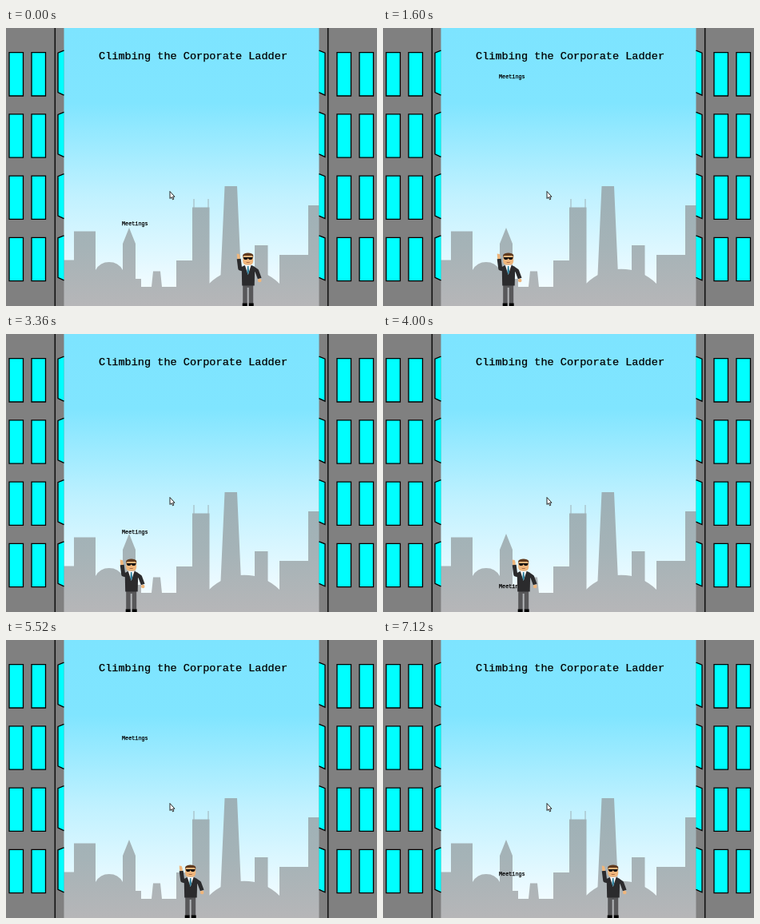
Animation of 464x348 px, one loop 7.2 s. Source, as an HTML page:

```html
<!DOCTYPE html>
<html lang="en">
<head>
<meta charset="utf-8">
<title>Climbing the Corporate Ladder</title>
<style>
  html, body { margin: 0; width: 100%; height: 100%; overflow: hidden; }
  svg { display: block; width: 464px; height: 348px; }
  text { font-family: "Courier New", "Liberation Mono", monospace; stroke: #000; stroke-width: .25; }
</style>
</head>
<body>
<svg viewBox="0 0 464 348" xmlns="http://www.w3.org/2000/svg">
  <defs>
    <linearGradient id="sky" x2="0" y2="1">
      <stop offset="0" stop-color="#7de4ff"/>
      <stop offset=".27" stop-color="#80e5ff"/>
      <stop offset=".6" stop-color="#c0f1ff"/>
      <stop offset=".95" stop-color="#f4fcff"/>
    </linearGradient>
    <linearGradient id="haze" gradientUnits="userSpaceOnUse" x1="0" x2="0" y1="198" y2="348">
      <stop offset="0" stop-color="#9cb0b6"/>
      <stop offset=".5" stop-color="#a5b3b7"/>
      <stop offset="1" stop-color="#b6b6b8"/>
    </linearGradient>
    <g id="front">
      <path fill="#808080" d="M0 0H72.500V348H0z"/>
      <path stroke="#111" stroke-width="1.6" d="M61.300 0V348"/>
    </g>
    <path id="panes" d="M4 31h17.500v54.300h-17.500zM32 31h17.500v54.300h-17.500z"/>
    <g id="floor" fill="#0ff" stroke="#000" stroke-width="1.3">
      <use href="#panes"/>
      <use href="#panes" x="410"/>
      <path d="M72.500 28.500L65 31.500V81L72.500 84.500"/>
      <path d="M391.500 28.500L399 31.500V84.500L391.500 81"/>
    </g>
  </defs>

  <rect width="464" height="348" fill="url(#sky)"/>
  <g fill="url(#haze)">
    <path d="M72 348V290.500H85V254.500H112V303A19.500 19.500 0 0 1 146 303V270L154 250L162 270V314H169V324H182L184 304.500H193L195 324H213V291H233V224.500H254.500V348z"/>
    <path d="M254 348V320A62 62 0 0 1 342 320V284H378V222H392V348z"/>
    <path d="M268 320L273.500 198H289L294.500 320zM311 320V272H327.500V320z"/>
    <path d="M234.500 214h1v11h-1zM252.500 214h1v11h-1z"/>
  </g>

  <use href="#front"/>
  <use href="#front" transform="matrix(-1 0 0 1 464 0)"/>
  <g id="windows"></g>

  <text x="116" y="39" font-size="13.57">Climbing the Corporate Ladder</text>
  <text id="label" x="145" font-size="6.8">Meetings</text>

  <g id="man">
    <path fill="#58585a" d="M-6.500 320H6.500V345H1V325H-1V345H-6.500z"/>
    <path d="M-7 344.500H-1V348H-7zM1 344.500H7V348H1z"/>
    <path fill="none" stroke="#2b2b2d" stroke-width="5" stroke-linejoin="round" d="M-11.500 289L-10 301L-4 302.500M6 300.500L11 304L14.500 313.500"/>
    <path fill="#2b2b2d" d="M-8 299Q-5 296.500 0 296.500Q7 296.500 8.500 300L8 322.500H-7.500z"/>
    <path fill="#fff" d="M-4 296.500H4L0 309z"/>
    <path fill="#2b7f9c" d="M-.8 298H.8L1.300 305L0 309L-1.300 305z"/>
    <g fill="#efb67c">
      <path d="M-14 282.500L-11 283L-10 286V289H-13.500z"/>
      <circle cx="14.500" cy="316" r="2.300"/>
      <rect x="-6.500" y="282.500" width="13" height="14" rx="4.500"/>
    </g>
    <path fill="#5f3a1e" d="M-6.500 287V284Q-5 281.500 0 281.500Q5 281.500 6.500 284V287L5 285H-5z"/>
    <path fill="#111" d="M-6 287H6V287.800L4.500 290H1.500L0 288.300L-1.500 290H-4.500L-6 287.800z"/>
    <path stroke="#9a5a38" stroke-width=".8" d="M-2 293.500H2"/>
  </g>

  <path fill="#fff" stroke="#111" stroke-width=".9" d="M205 204.500V213.500L207 211.700L208.500 214.800L209.900 214.100L208.500 211.200H211z"/>
</svg>
<script>
  const STEP = 80, COUNT = 90;
  const FLOORS = 4, FLOOR_GAP = 77.2;
  const WALK_SPEED = 16.9, FALL_SPEED = 8.5, FALL_HEIGHT = 354;

  // The man paces between these places, then stops at the last one.
  const turns = [303, 181, 275, 155, 209, 94, 164, 93, 234, 110, 257, 190, 288];

  const $ = id => document.getElementById(id);

  function walkX(n) {
    let left = n * WALK_SPEED;
    for (let i = 1; i < turns.length; i++) {
      const leg = turns[i] - turns[i - 1];
      if (left < Math.abs(leg)) return turns[i - 1] + Math.sign(leg) * left;
      left -= Math.abs(leg);
    }
    return turns.at(-1);
  }

  const fallY = n => (246.5 + n * FALL_SPEED) % FALL_HEIGHT;

  for (let i = 0; i < FLOORS; i++) {
    $("windows").innerHTML += `<use href="#floor" y="${i * FLOOR_GAP - .3}"/>`;
  }

  function draw(time) {
    const n = Math.floor(time / STEP) % COUNT;
    $("man").setAttribute("transform", `translate(${Math.round(walkX(n)) - .3} 0)`);
    $("label").setAttribute("y", fallY(n));
  }

  let start;
  function tick(now) {
    start ??= now;
    draw(now - start);
    requestAnimationFrame(tick);
  }
  draw(0);
  requestAnimationFrame(tick);
</script>
</body>
</html>
```
